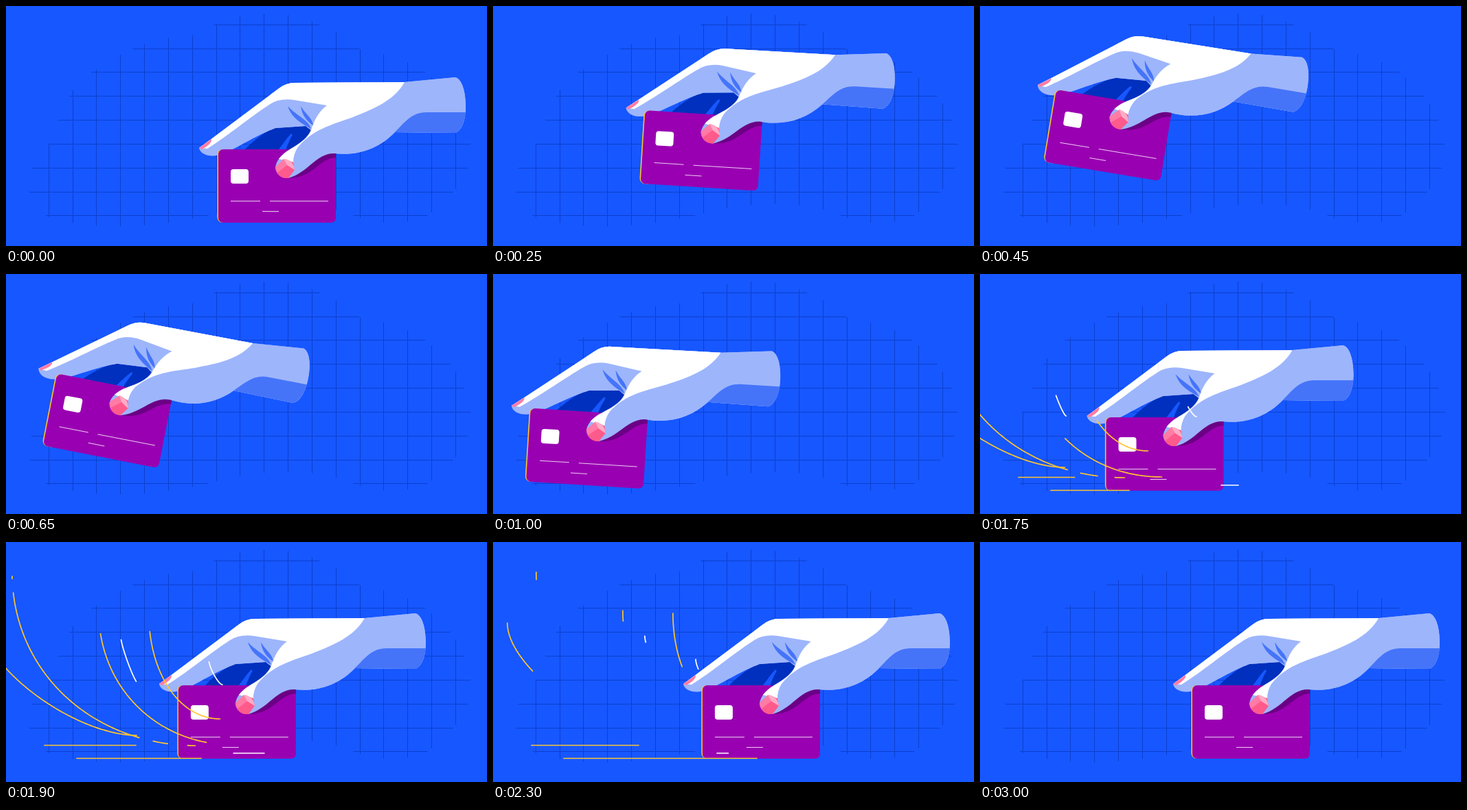
An HTML page with a canvas for the animation above (3.5 s loop, 700 by 350 pixels).

```html
<!DOCTYPE html>
<html lang="en">
<head>
<meta charset="utf-8">
<title>Card swipe</title>
<style>
  html, body { margin: 0; width: 100%; height: 100%; overflow: hidden; background: #1757ff; }
  canvas { display: block; }
</style>
</head>
<body>
<canvas id="stage" width="700" height="350"></canvas>
<script>
const ctx = document.getElementById('stage').getContext('2d');
const LOOP = 3500, STEP = 50, TRAVEL = 258;
const BLUE = '#1757ff', GRID = '#0c40cf', NAVY = '#0030bd', SKY = '#9db5fb', SHADE = '#4574f9';
const PURPLE = '#9900b1', PLUM = '#6b0085', YELLOW = '#ffc52e', WHITE = '#fff';

const span = (t, a, b) => Math.min(1, Math.max(0, (t - a) / (b - a)));
const smooth = p => p * p * (3 - 2 * p);
const easeOut = p => 1 - (1 - p) ** 2;
const cubic = (a, b, c, d, u) => {
  const v = 1 - u;
  return a * v * v * v + 3 * b * u * v * v + 3 * c * u * u * v + d * u * u * u;
};

// CSS-like cubic-bezier(x1, 0, x2, 1)
function ease(p, x1, x2) {
  let lo = 0, hi = 1;
  for (let i = 0; i < 24; i++) {
    const mid = (lo + hi) / 2;
    if (cubic(0, x1, x2, 1, mid) < p) lo = mid; else hi = mid;
  }
  return smooth(lo);
}

// An even grid seen through a cloud-shaped outline
const PITCH = 34.83;
const cloud = new Path2D('M62 308 C22 284 24 235 62 202 C80 160 92 110 131 93 C180 60 215 46 271 43 ' +
  'C310 22 340 11 378 11 C435 11 450 26 480 38 L515 63 C560 70 600 85 619 104 C655 130 690 190 672 236 ' +
  'C662 265 635 290 613 306 C580 320 545 320 509 307 C460 285 380 280 289 307 C220 322 130 330 62 308 Z');

function drawGrid() {
  ctx.save();
  ctx.clip(cloud);
  ctx.fillStyle = GRID;
  for (let i = 0; i < 18; i++) {
    ctx.fillRect(Math.floor(62.3 + i * PITCH), 0, 1, 350);
    if (i < 9) ctx.fillRect(0, Math.floor(27.3 + i * PITCH), 700, 1);
  }
  ctx.restore();
}

// Hand and card shapes, in resting coordinates
const shape = (color, d) => [color, new Path2D(d)];
const under = [
  shape(NAVY, 'M343 214 C358 198 374 185 390 178 L437 174 L450 178 L432 214 Z'),
  shape(BLUE, 'M394 213 C402 203 408 193 415 186 L417 188 C413 195 409 204 406 213 Z')
];
const hand = [
  shape(SKY, 'M281 207 L300 193 L396 121 Q407 112 421 112 L580 111 L654 104 C664 107 669 126 669 146 ' +
    'C669 165 664 181 654 185 L566 184 C543 208 512 219 478 215 C452 214 440 243 411 251 ' +
    'C400 251 393 245 392 236 C393 227 399 219 408 212 C424 203 438 194 444 181 L436 175 L392 178 ' +
    'C352 194 328 214 306 218 C294 220 283 216 281 207 Z'),
  shape(WHITE, 'M281 207 L300 193 L396 121 Q407 112 421 112 L580 111 C565 138 535 150 505 162 ' +
    'C472 174 446 180 424 207 Q418 217 418 228 L397 223 C410 206 436 202 444 181 ' +
    'C449 165 456 153 467 145 L419 137 Q397 134 383 144 C358 160 322 190 293 208 Z'),
  shape(SHADE, 'M669 155 C667 170 662 182 654 185 L566 184 C580 170 590 155 612 155 Z'),
  shape(SHADE, 'M410 146 C416 164 430 171 444 179 C440 166 423 160 410 146 Z'),
  shape(SHADE, 'M429 146 C431 160 438 168 447 174 C446 163 436 158 429 146 Z'),
  shape('#ff7ba6', 'M281 207 L299 194 C300 199 294 204 285 209 Z'),
  shape('#ff5a8c', 'M392 235 L405 223 L418 228 L420 239 L411 251 C401 252 394 247 392 235 Z'),
  shape('#ff7ba6', 'M392 235 L404 223 L409 232 L395 243 Z'),
  shape('#ffabc6', 'M404 223 C412 223 419 229 420 239 L409 232 Z')
];
const thumbShadow = shape(PLUM, 'M480 214 L480 221 C455 222 448 251 411 251 L440 218 Z');

const paint = list => list.forEach(([color, path]) => {
  ctx.fillStyle = color;
  ctx.fill(path);
});

function box(color, x, y, w, h, r) {
  ctx.fillStyle = color;
  ctx.beginPath();
  ctx.roundRect(x, y, w, h, r);
  ctx.fill();
}

function drawCard() {
  box(YELLOW, 307.4, 209, 20, 107, 8);
  box(PURPLE, 309, 209, 171, 107, 7);
  paint([thumbShadow]);
  box(WHITE, 327, 238, 26, 21, 4);
  ctx.fillStyle = '#edcbf3';
  ctx.fillRect(327, 284, 43, 1);
  ctx.fillRect(384, 284, 85, 1);
  ctx.fillRect(373, 299, 24, 1);
}

// Lift and carry left along an arc, then swipe right along the ground
function pose(t) {
  if (t < 1400) {
    const u = ease(span(t, 0, 1250), 0.27, 0.14);
    const tilt = ease(1 - Math.abs(t - 625) / 625, 0.45, 0.55);
    return { x: -TRAVEL * cubic(0, 0.333, 1, 1, u), y: -cubic(0, 62, 134, 0, u), angle: t < 1250 ? 11.1 * tilt : 0 };
  }
  return { x: -TRAVEL * (1 - ease(span(t, 1500, 2500), 0.3, 0.02)), y: 0, angle: 0 };
}

function drawHand({ x, y, angle }) {
  ctx.save();
  ctx.translate(394.5 + x, 262.5 + y);
  ctx.rotate(angle * Math.PI / 180);
  ctx.translate(-394.5, -262.5);
  paint(under);
  paint(hand);
  drawCard();
  // The thumb side lies over the card
  ctx.beginPath();
  ctx.rect(385, 90, 300, 200);
  ctx.clip();
  paint(hand);
  ctx.restore();
}

// Paths: an arc leaves the ground flat and ends upright
const arc = (x0, y0, x1, y1, bend = 0.57) => u => [
  cubic(x0, x0 + (x1 - x0) * bend, x1, x1, u),
  cubic(y0, y0, y1 + (y0 - y1) * bend, y1, u)
];
const line = (x0, x1, y) => u => [x0 + (x1 - x0) * u, y];

const sweep = { rides: true, color: YELLOW, draw: [1500, 2000], wipe: [1880, 2560], curve: smooth, gaps: [] };
const spark = { ...sweep, rides: false, color: WHITE };
const ground = { ...sweep, rides: false, wipe: [2480, 3000] };
const trails = [
  { ...sweep, path: arc(-60, 282, -284, 118, 0.4) },
  { ...sweep, path: arc(27, 297, -242, 44), draw: [1500, 1930], wipe: [1880, 2360],
    gaps: [[0.035, 0.087], [0.15, 0.188], [0.932, 0.975]] },
  { ...sweep, path: arc(81, 296, -116, 100), wipe: [1765, 2380] },
  { ...sweep, path: arc(61, 258, -43, 104) },
  { ...sweep, path: arc(-58, 207, -84, 137, 0.2), color: WHITE, wipe: [1700, 2500] },
  { ...spark, path: arc(315, 208, 295, 171, 0.3) },
  { ...spark, path: line(376, 326, 308) },
  { ...ground, path: line(56, 212, 296.5), draw: [1430, 2050] },
  { ...ground, path: line(103, 392, 315.5), draw: [1550, 2450], curve: easeOut }
];

function drawTrail({ path, draw, wipe, curve, gaps, color, rides }, t, cardX) {
  const from = smooth(span(t, ...wipe)), to = curve(span(t, ...draw));
  if (to <= from) return;
  const dx = rides ? cardX : 0;
  let pen = 'moveTo';
  ctx.beginPath();
  for (let i = 0; i <= 120; i++) {
    const u = from + (to - from) * i / 120;
    if (gaps.some(([a, b]) => u > a && u < b)) {
      pen = 'moveTo';
      continue;
    }
    const [x, y] = path(u);
    ctx[pen](dx + x, y);
    pen = 'lineTo';
  }
  ctx.strokeStyle = color;
  ctx.stroke();
}

function frame() {
  const t = Math.floor(performance.now() % LOOP / STEP) * STEP;
  const p = pose(t);
  ctx.fillStyle = BLUE;
  ctx.fillRect(0, 0, 700, 350);
  drawGrid();
  drawHand(p);
  ctx.lineWidth = 1.7;
  ctx.lineCap = 'round';
  trails.forEach(trail => drawTrail(trail, t, 309 + p.x));
  requestAnimationFrame(frame);
}
frame();
</script>
</body>
</html>
```
